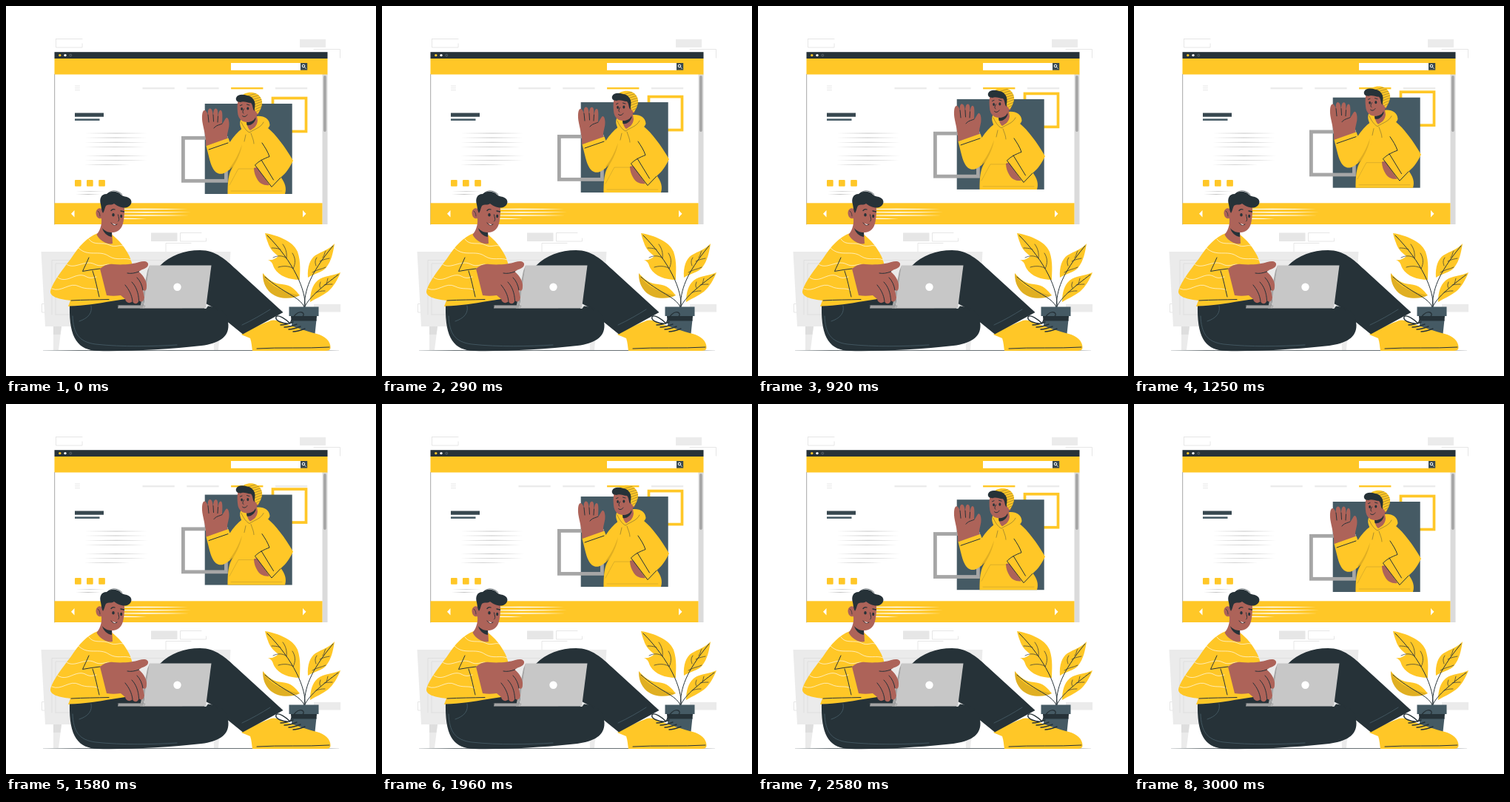
An HTML page that plays this animation: 500x500 px, repeating every 3.04 s.

```html
<!DOCTYPE html>
<html lang="en">
<head>
<meta charset="utf-8">
<title>Online chat</title>
<style>
html, body { margin: 0; width: 100%; height: 100%; overflow: hidden; background: #fff; }
svg { display: block; width: 100vw; height: 100vh; }
path { stroke-linecap: round; stroke-linejoin: round; }
.y { fill: #ffc727; }
.d { fill: #263238; }
.s { fill: #455a64; }
.k { fill: #ad6359; }
.g { fill: #ebebeb; }
.w { fill: #fff; }
.ln { fill: none; stroke: #263238; stroke-width: 1; }
.wl { fill: none; stroke: #fff; stroke-width: .8; }
.sl { fill: none; stroke: #455a64; stroke-width: .9; }
.gl { fill: none; stroke: #e0e0e0; stroke-width: .8; }
.thin { stroke-width: .7; }
</style>
</head>
<body>
<svg viewBox="0 0 500 500" xmlns="http://www.w3.org/2000/svg">
  <defs>
    <linearGradient id="floor" gradientUnits="userSpaceOnUse" x1="50" x2="450" y1="0" y2="0">
      <stop offset="0" stop-color="#c8ccce"/>
      <stop offset=".12" stop-color="#263238"/>
      <stop offset=".9" stop-color="#263238"/>
      <stop offset="1" stop-color="#dfe1e2"/>
    </linearGradient>
    <clipPath id="cap"><path d="M318 123C320 118 327 116 334 117C343 119 347 126 346 133C345 138 343 142 340 146L335 139C337 132 333 125 318 123Z"/></clipPath>
  </defs>

  <!-- scattered boxes -->
  <path class="gl" d="M67.5 44.500H103M67.500 44.500V56H103V51M416 58.500H451.500V70"/>
  <rect class="g" x="397" y="45" width="35" height="11"/>
  <rect x="196" y="306.500" width="35.500" height="11.500" fill="#e6e6e6"/>
  <path class="gl" d="M264 306.500H235.500V318H270.500V314M250 320.500H216V332"/>
  <rect class="g" x="416" y="403" width="36" height="10.500"/>
  <path class="gl" d="M52 402.500H48.500V414H54"/>

  <!-- browser window -->
  <rect class="w" x="65.500" y="71" width="369" height="224"/>
  <rect x="427.500" y="92" width="7" height="203" fill="#dbdbdb"/>
  <rect x="429" y="94" width="3.800" height="76" rx="1.900" fill="#a6a6a6"/>
  <rect class="y" x="65.500" y="71" width="369" height="21.500"/>
  <rect class="d" x="65.500" y="62.200" width="369" height="8.800"/>
  <circle class="y" cx="72.800" cy="66.600" r="1.700"/>
  <circle class="w" cx="80" cy="66.600" r="1.700"/>
  <circle cx="87.300" cy="66.600" r="1.400" fill="none" stroke="#7c868b" stroke-width=".6"/>
  <rect class="w" x="304" y="77" width="94" height="9.800"/>
  <rect x="398" y="77" width="9.200" height="9.600" fill="#37474f"/>
  <circle cx="402" cy="81" r="1.800" fill="none" stroke="#fff" stroke-width="1"/>
  <path class="wl" d="M403.500 82.500L405.300 84.500"/>
  <path d="M65.700 92.500V295" stroke="#a6a6a6" stroke-width="1"/>
  <path class="gl" d="M93.500 108H99.500M93.500 110.800H99.500M93.500 113.600H99.500"/>
  <g id="nav"></g>
  <rect x="93" y="144.500" width="39" height="5.200" fill="#37474f"/>
  <rect x="93" y="152.300" width="33.500" height="2.600" fill="#455a64"/>
  <g id="copy"></g>
  <rect class="y" x="93" y="235" width="8.700" height="8.700" rx="1"/>
  <rect class="y" x="109" y="235" width="8.700" height="8.700" rx="1"/>
  <rect class="y" x="125.200" y="235" width="8.700" height="8.700" rx="1"/>
  <rect class="y" x="65.500" y="266.300" width="362" height="28.700"/>
  <path class="w" d="M92.500 276V285.500L88 280.800ZM401 276V285.500L405.500 280.800Z"/>
  <g id="caption"></g>

  <!-- floating picture -->
  <g id="float">
    <rect x="360.500" y="124.500" width="45" height="45" fill="none" stroke="#ffc727" stroke-width="3.700"/>
    <rect class="s" x="268.700" y="132" width="118" height="122"/>
    <rect x="239.400" y="178.300" width="58" height="58" fill="none" stroke="#a6a6a6" stroke-width="4.800"/>

    <path class="k" d="M270 189C271 180 268 170 266 160C264 150 265 141.500 268 141C270 140.500 272 144 273 148C272 141 274 138 276 138.500C279 139 279 144 280 148C280 141 282 138 284 138.700C287 139.500 286 146 286.500 150C287 144 288.500 140 290.500 141C293 142 292.500 151 292 159C294 158 296 152 298 151C301 150.500 302 158 301.300 163C300 170 298 175 299.500 180Z"/>
    <path class="ln" d="M273 147L274 157M280 147L280.500 156M286.500 149L286 157M292 159C288 161 284 161 281 165"/>

    <path class="y" d="M319 165C325 162 338 169 354 165C364 173 377 190 388 209C383 219 379 225 371.500 231.500C377 239 379.500 246 377 254H299.500C299.500 242 300 232 303 224C306 216 311 209 313 199L309 184Z"/>
    <path class="y" d="M270.500 189L300.500 178.500L302.500 184C307 177 313 170 320 165L326 183C320 200 307 222 293 226.500C281 229 277 215 274 203Z"/>
    <path d="M319 187C314 201 308 212 302 219C304 221 304 223 303 225C309 213 317 202 319 187Z" opacity=".12"/>
    <path class="ln" d="M274 194L300 185"/>

    <path class="k" d="M335 219C339 217 342 219 345 224L356 242C349 243 343 240 340 235C337 230 335 225 335 219Z"/>
    <path class="y" d="M337 214.500L345 206L371.500 231.500L359 246Z"/>
    <path class="ln" d="M346 185C350 191 354 197 356 203.500C349 206 341 210 336.500 215L359 244.500L371 232M345 208L361.500 235"/>
    <path class="ln thin" d="M302 242C307 233 310 227 314 220H337M304 250H373" opacity=".22"/>

    <path class="y" d="M317 154C321 150 330 149 339 149C348 148 356 152 356.500 161C355 167 348 169 341 170C334 171 329 173 325 175C320 170 314 162 317 154Z"/>
    <path class="d" d="M324 153C328 160 334 162 338 157L337 149Z"/>
    <path class="k" d="M325 151L338 142L340 155C339 163 335 165 330 168C326 165 325 158 325 151Z"/>
    <path class="d" d="M325 157C331 157 335 153 337 149L337.500 153C335 159 330 162 325.500 161Z"/>
    <path class="ln thin" d="M318 157C321 164 325 169 329 171C336 166 344 165 348 157M324 174L322 183M331 172C333 178 335 182 335 186" opacity=".55"/>

    <path class="k" d="M314 126C324 123 335 126 338 133L338.500 145C338 152 334 157 326 157C319 157 315 153 313.500 147C312.500 141 312 133 314 126Z"/>
    <ellipse class="k" cx="339" cy="143" rx="2.800" ry="4"/>
    <path class="y" d="M318 123C320 118 327 116 334 117C343 119 347 126 346 133C345 138 343 142 340 146L335 139C337 132 333 125 318 123Z"/>
    <g id="ribs" clip-path="url(#cap)"></g>
    <path class="d" d="M311 124C313 119 320 119 326 121C333 122 337 128 336.500 134C336 138 336 140 335.500 142C333 139 334 134 331 131C326 131 321 128 317 130C312 130 310 127 311 124Z"/>
    <ellipse class="d" cx="318.600" cy="139" rx="1.400" ry="2"/>
    <ellipse class="d" cx="326.800" cy="138.500" rx="1.500" ry="2.100"/>
    <path class="ln" d="M316.500 134.500L319 133.500M325.500 133L329 134M321.500 139C320 142 319 144 321 145M319.500 148.500C321.500 150.500 324.500 149.500 326 147"/>
  </g>

  <!-- sofa -->
  <path class="g" d="M47.500 332H303.500L297 433H53Z"/>
  <path class="gl" d="M62 417V343.500H288V404M67 417V348H190M67 417H86" style="stroke:#dcdcdc"/>
  <path class="g" d="M64 433H75L71 465H64ZM280 440H289L287 465H281Z"/>
  <path d="M64 433H75L73.500 444H64Z" fill="#dedede"/>

  <!-- plant -->
  <path class="y" d="M350 307C368 310 388 318 394 332C399 347 397 360 397 370C383 370 369 365 363 355C360 350 361 346 354 343C359 344 364 342 368 338C361 333 356 327 354 320C352 315 351 311 350 307Z"/>
  <path class="y" d="M444 321C442 333 440 344 433 353C428 360 415 362 408 367C407 352 411 342 418 337C428 331 437 329 444 321Z"/>
  <path class="y" d="M347 361C356 371 362 375 373 376C386 377 391 384 397 391C385 397 368 396 358 388C349 380 347 371 347 361Z"/>
  <path d="M347 361C353 374 366 385 397 391C385 397 368 396 358 388C349 380 347 371 347 361Z" opacity=".12"/>
  <path class="y" d="M452 360C448 370 443 379 435 386C427 392 419 395 411 400C411 387 414 377 421 371C429 364 443 365 452 360Z"/>
  <path class="ln" d="M404 407C406 384 388 345 353 310M403 407C404 384 409 364 442 324M403 407C398 393 374 388 350 366M404 406C410 393 428 379 449 363"/>
  <path class="ln thin" d="M378 340C373 337 367 337 361 340M387 354C382 351 374 351 368 353M371 329C366 327 362 327 359 327M379 341C380 334 378 327 374 322M388 355C392 347 391 340 387 334M419 351C417 346 418 343 420 340M428 340C431 337 430 333 432 331M414 360C420 356 426 356 432 353M424 345C430 342 433 342 437 341M425 381C423 378 424 376 425 373M433 375C435 371 434 369 435 368M419 387C425 385 428 385 431 385M430 377C435 376 438 376 441 376"/>
  <path class="s" d="M382.500 406.500H422.500V419H382.500ZM385.500 424H419.500L417.500 443H387.500Z"/>
  <path class="d" d="M385 419H420L419.500 425.500H385.500Z"/>

  <rect x="50" y="465.200" width="400" height=".7" fill="url(#floor)"/>

  <!-- shoe and sweater -->
  <path class="y" d="M318 444C330 436 348 429 358 425C365 423 371 427 377 429C391 434 407 440 420 443C431 446 439 453 438.500 462C438 465 436 466 430 466H333C332 460 332 455 330 449Z"/>
  <path class="ln" d="M339 463C370 461 405 463 437 461"/>
  <path class="ln" style="stroke-width:1.400" d="M371 431C377 431 383 429 388 427M376 434C382 434 388 432 393 430M382 437C388 437 393 435 398 433M388 440C394 440 399 438 404 436M384 429C374 430 363 425 365 420C368 416 379 424 384 429C388 419 394 412 400 414C406 417 399 424 390 421"/>
  <path class="y" d="M124 307C110 312 98 325 88 341C75 358 62 375 60 386C60 393 71 396 87 398L84 406L152 404L174 386L170 347C167 335 157 320 144 309.500Z"/>
  <path class="wl" style="stroke-width:.65" d="M112 315C119 325 130 318 140 323C148 327 153 322 158 324M98 327C111 340 126 329 139 338C150 345 160 339 169 343M82 349C93 357 106 342 120 349C128 353 133 349 139 349M70 367C83 376 94 359 107 365C114 369 118 367 122 366M62 382C75 388 86 372 99 379C109 384 118 380 125 384"/>
  <path class="ln" d="M112 340C109 347 106 353 103.500 358.500C111 357 119 356 127 355M117 358C121 369 123 381 126 393M88 398C105 397 122 397 139 396.500"/>

  <!-- legs -->
  <path class="d" d="M208 351C222 337 241 330 262 330C284 330 298 344 310 355L374.500 414L320 443.500L270 403L205 390Z"/>
  <path class="sl" d="M319 431C332 425 346 417 357 410"/>
  <path class="d" d="M86 405.500C105 405 125 402 142 399L187 392V403L273 405C291 406 300 416 300.500 431C301 448 287 456 264 459C220 464 162 467 124 466C98 465 85 450 86 405.500Z"/>
  <path class="w" d="M270 402L283 409H268Z" opacity=".9"/>
  <path class="d" d="M273 405.500L283 407L286 412H268Z"/>
  <path class="sl" d="M115 405C117 415 111 422 99 426M90 419C91 442 98 454 121 457C158 461 199 460 231 458"/>

  <!-- head -->
  <path class="k" d="M129 282C130 295 128 302 122.500 309C127 318 138 323 144 321L143 300Z"/>
  <path class="d" d="M130 300C134 305 139 306 143 306L143 312C137 311 132 307 130 300Z"/>
  <path class="k" d="M129 267C138 260 154 264 160 270C160 279 160 289 157 297C154 304 148 307 141 305.500C134 303 130 295 128.500 286Z"/>
  <path class="k" d="M130 275C126 271 121.500 275 121.500 280C122 286 126 289 130 286Z"/>
  <path class="ln thin" d="M124 277C126 278 127 281 127 284"/>
  <path class="d" d="M128 268C126 261 128 254 136 254C141 249.500 151 250 155 254.500C158 258 163 257 167 260C172 264 169 271 162 272.500C155 273 150 270 146 267C143 270 138 267 135 270C133 274 133 277 131 280C129 277 129 272 128 268Z"/>
  <path class="ln thin" d="M138 253C143 248 152 249 157 255"/>
  <ellipse class="d" cx="145" cy="282.200" rx="1.700" ry="2.300"/>
  <ellipse class="d" cx="155.700" cy="284" rx="1.500" ry="2.200"/>
  <path class="ln" style="stroke-width:1.300" d="M142 276.500C143.500 274.500 145.500 274.500 147 275M155 277L159.500 278"/>
  <path class="ln" d="M151.500 282C152 286 154 289 151.500 291M142 293C144 296 147 297 150 295"/>
  <path class="w" d="M144 294L148.500 295.300C147 296.300 145.200 295.800 144 294Z"/>

  <!-- laptop and hand -->
  <path d="M152 404.500H187V408.500H151Z" fill="#a6a6a6"/>
  <path d="M194 350.500H277.500L270 408.500H185Z" fill="#c7c7c7"/>
  <path d="M194 350.500L185 408.500H181L191 358Z" fill="#a6a6a6"/>
  <path d="M151 405H188L186 408.500H238" fill="none" stroke="#8d8d8d" stroke-width=".6"/>
  <circle class="w" cx="231.500" cy="379.700" r="5.200"/>
  <path class="k" d="M127 355C133 350 139 348 145 349C157 350 172 349 180 346C188 343.500 193 346 192 350C191 355 184 355 179.500 359C187 365 191 374 190 380C190 384 188 386 185 384L187 394C186 400 182 401 179.500 397.500C179 403 173 404 171 399C167 403 162 401 161 396L155 391C148 392 142 392 136 391Z"/>
  <path class="ln" d="M179.500 359C174 361 169 362 164 361M171 399C170 390 166 383 161 377M179.500 397.500C179 388 176 379 170 373M185 384C184 377 181 371 177 367"/>
</svg>

<script>
const NS = "http://www.w3.org/2000/svg";
const get = id => document.getElementById(id);

function add(parent, tag, attrs) {
  const el = document.createElementNS(NS, tag);
  for (const key in attrs) el.setAttribute(key, attrs[key]);
  get(parent).append(el);
}

// A thin line that tapers to both ends.
function taper(parent, x1, x2, y, weight, fill) {
  const mid = (x1 + x2) / 2;
  add(parent, "path", {
    d: `M${x1} ${y}Q${mid} ${y - weight} ${x2} ${y}Q${mid} ${y + weight} ${x1} ${y}Z`, fill
  });
}

for (let i = 0; i < 4; i++) {
  add("nav", "rect", {
    x: 184.5 + i * 59.8, y: 110, width: 43.3, height: 2.4,
    fill: i === 2 ? "#ffc727" : "#ebebeb"
  });
}

[[172, 192], [178, 191], [184.3, 192], [190.4, 188], [202.5, 192], [208.4, 191], [214.4, 167]]
  .forEach(([y, end]) => taper("copy", 106, end, y, .9, "#c4c4c4"));
taper("copy", 94, 134, 250.3, .8, "#c4c4c4");
taper("copy", 94, 128, 254.5, .8, "#c4c4c4");

[[274.5, 246], [278.7, 250], [283, 248], [287.4, 190]]
  .forEach(([y, end]) => taper("caption", 128, end, y, 1.4, "#fff"));

for (let i = 0; i < 9; i++) {
  const y = 117 + i * 3.2;
  add("ribs", "path", {
    d: `M${321 + i * 1.8} ${y + 7}Q${332 + i} ${y + 2} 348 ${y - 1}`,
    class: "ln", style: "stroke-width:.55", opacity: .65
  });
}

const LOOP = 3040, FPS = 24, HALF = 1500, RISE = 10;
const picture = get("float");

function draw() {
  const t = performance.now() % LOOP;
  const step = Math.floor((t + 5) * FPS / 1000);
  const ms = Math.min(step * 1000 / FPS, HALF * 2);
  const y = -RISE * (1 - Math.abs(ms - HALF) / HALF);
  picture.setAttribute("transform", `translate(0 ${y.toFixed(3)})`);
  requestAnimationFrame(draw);
}
draw();
</script>
</body>
</html>
```
